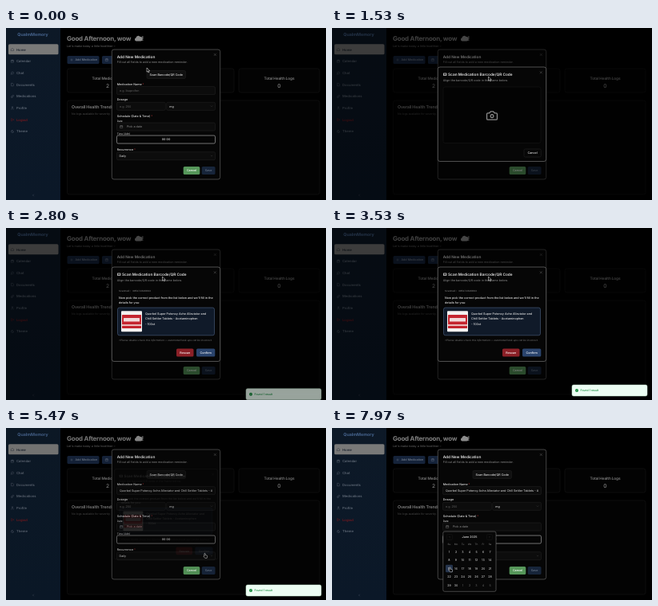
Write an HTML page that moves like this. It is 400 px wide and 216 px high and loops after 8000 ms.

```html
<!DOCTYPE html>
<html lang="en">
<head>
<meta charset="utf-8">
<title>Medication reminder</title>
<style>
html, body { margin: 0; width: 100%; height: 100%; overflow: hidden; background: #000; }
svg { display: block; }
#stage { width: 100%; height: 100%; font-family: Inter, "Open Sans", sans-serif; }
text { text-rendering: geometricPrecision; }
.mono { font-family: "Liberation Mono", "DejaVu Sans Mono", monospace; }
.tight { letter-spacing: -.025em; }
</style>
</head>
<body>
<svg id="stage" viewBox="0 0 400 216"></svg>
<script>
const LOOP = 8000;

// Markup helpers; text is placed by its vertical centre
const text = (x, y, s, { size = 3.7, fill = '#e4e4e4', w = 400, at = 'start', more = '' } = {}) =>
  `<text x="${x}" y="${y + size * .36}" font-size="${size}" fill="${fill}" font-weight="${w}" text-anchor="${at}" ${more}>${s}</text>`;
const mid = (x, y, s, o) => text(x, y, s, { at: 'middle', w: 500, ...o });
const box = (x, y, w, h, fill, line = 'none', r = 1.6, more = '') =>
  `<rect x="${x}" y="${y}" width="${w}" height="${h}" rx="${r}" fill="${fill}" stroke="${line}" stroke-width=".5" ${more}/>`;
const icon = (x, y, size, d, color, weight = 2) =>
  `<path transform="translate(${x - size / 2} ${y - size / 2}) scale(${size / 24})" d="${d}" fill="none" stroke="${color}" stroke-width="${weight}" stroke-linecap="round" stroke-linejoin="round"/>`;
const group = (id, body) => `<g id="${id}">${body}</g>`;

const CROSS = 'M5 5l14 14M19 5 5 19', DOWN = 'M6 9l6 6 6-6', LEFT = 'M15 6l-6 6 6 6', RIGHT = 'M9 6l6 6-6 6';
const DATE = 'M4 5h16v16H4ZM4 10h16M8 2v5M16 2v5', PLUS = 'M12 5v14M5 12h14';
const CAMERA = 'M14.5 4h-5L7 7H4a2 2 0 0 0-2 2v9a2 2 0 0 0 2 2h16a2 2 0 0 0 2-2V9a2 2 0 0 0-2-2h-3ZM12 10a3 3 0 1 0 .1 0';
const NAV = [
  ['Home', 'M3 10l9-7 9 7v11H3Z'],
  ['Calendar', DATE],
  ['Chat', 'M3 21l2-5a8 8 0 1 1 4 4Z'],
  ['Documents', 'M6 2h8l5 5v15H6Z'],
  ['Medications', 'M10 20 20 10a4 4 0 0 0-6-6L4 14a4 4 0 0 0 6 6ZM9 9l6 6'],
  ['Profile', 'M5 21v-2a4 4 0 0 1 4-4h6a4 4 0 0 1 4 4v2M12 3a4 4 0 1 0 .1 0'],
  ['Logout', 'M9 21H4V3h5M16 17l5-5-5-5M21 12H9'],
  ['Theme', 'M12 3a6 6 0 0 0 9 9 9 9 0 1 1-9-9'],
];
const PRODUCT = ['Quorbel Super Potency Ache Alleviator and', 'Chill Settler Tablets - Acetaminophen', '- 100ct'];
const MUTED = '#8c8c8c', FAINT = '#626262', FIELD = '#0c0c0c', LINE = '#242424', EDGE = '#858585';
const ACTION = '#15233a', ACTION_TEXT = '#77818f';

function sidebar() {
  const items = NAV.map(([name, d], i) => {
    const y = 27 + i * 14.7, color = name === 'Logout' ? '#86181d' : i ? '#68727f' : '#141c28';
    return icon(8, y, 4.2, d, color) + text(13, y, name, { size: 4.2, fill: color, w: 500 });
  }).join('');
  return box(0, 0, 68, 216, 'url(#navy)', 'none', 0) +
    mid(33.5, 8.3, 'QualmMemory', { size: 5.3, fill: '#47658f', w: 700 }) +
    box(3, 20.3, 62.5, 13, '#797978') + items + icon(34, 210, 4, LEFT, '#68727f');
}

function page() {
  const stat = (x, name, n) => box(x, 51, 101, 30, '#030303', '#1b1b1b', 2.6) +
    mid(x + 50.5, 63, name, { size: 4.76, fill: '#808080', w: 600, more: 'class="tight"' }) +
    mid(x + 50.5, 73, n, { size: 6.6, fill: '#808080' });
  return text(76, 13, 'Good Afternoon, wow', { size: 7.94, fill: '#808080', w: 700, more: 'class="tight"' }) +
    '<path d="M162.5 16.5a2.2 2.2 0 0 1 0-4.2 2.8 2.8 0 0 1 5-1.4 2.3 2.3 0 0 1 .6 5.6Z" fill="#8c8c8c"/>' +
    text(169.5, 13, '!', { size: 7.94, fill: '#808080', w: 700 }) +
    text(76, 22.6, "Let's make today a little healthier ~", { fill: '#666' }) +
    box(76.5, 35, 40, 10, ACTION) + icon(82, 40, 4, PLUS, ACTION_TEXT) +
    text(86.5, 40, 'Add Medication', { fill: ACTION_TEXT, w: 500 }) +
    box(120, 35, 40, 10, ACTION) + icon(126, 40, 4, DATE, ACTION_TEXT) +
    stat(76.5, 'Total Medications', '2') + stat(184, 'Total Appointments', '0') + stat(291, 'Total Health Logs', '0') +
    box(76.5, 91, 315.5, 118, '#030303', '#1b1b1b', 2.6) +
    text(82, 99.5, 'Overall Health Trends', { size: 5.3, fill: '#808080', w: 600, more: 'class="tight"' }) +
    text(82, 107.7, 'No logs available for severity.', { size: 3.5, fill: '#4a4a4a' });
}

function form() {
  const label = (y, s, star = true) => text(138.7, y, s + (star ? ' <tspan fill="#a33">*</tspan>' : ''), { w: 500 });
  const field = (y, x = 138.5, w = 123) => box(x, y, w, 10, FIELD, LINE);
  return box(132.3, 27, 135.4, 163, '#060606', EDGE, 2.6) +
    text(138.7, 36, 'Add New Medication', { size: 4.76, w: 600 }) +
    text(138.7, 43, 'Fill out all fields to add a new medication reminder.', { fill: MUTED }) +
    icon(261.3, 33.5, 4, CROSS, MUTED) +
    box(176, 53.5, 48.5, 10, '#101010', '#222') + mid(200.3, 58.5, 'Scan Barcode/QR Code') +
    label(70.3, 'Medication Name') + field(73.6) +
    text(142, 78.6, 'e.g. Ibuprofen', { fill: FAINT, more: 'id="hint"' }) +
    `<svg x="142" y="74" width="116" height="9.4">${text(0, 4.6, PRODUCT.join(' '), { more: 'id="name"' })}</svg>` +
    label(89.8, 'Dosage', false) + field(93.3, 138.5, 60.8) + field(93.3, 200.7, 60.8) +
    text(142, 98.3, 'e.g. 250', { fill: FAINT }) + text(204.2, 98.3, 'mg') + icon(257, 98.3, 3.6, DOWN, FAINT) +
    label(110.6, 'Schedule (Date &amp; Time)') +
    text(138.7, 117, 'Date', { size: 3.17 }) + box(138.5, 119, 123, 10, FIELD, LINE, 1.6, 'id="date"') +
    icon(144.3, 124, 4.2, DATE, MUTED) + text(151, 124, 'Pick a date', { fill: MUTED }) +
    text(138.7, 132.8, 'Time (24h)', { size: 3.17 }) + box(138.5, 135, 123, 10, '#050505', '#ddd', 1.6, 'id="time"') +
    mid(200, 140, '00:00') +
    label(152.3, 'Recurrence') + field(155.7) + text(141.5, 160.7, 'Daily') + icon(257, 160.7, 3.6, DOWN, FAINT) +
    box(221.7, 174, 20.6, 10, '#56975a') + mid(232, 179, 'Cancel', { fill: '#fff' }) +
    box(244.7, 174, 16.8, 10, '#17253a') + mid(253.1, 179, 'Save', { fill: '#697688' });
}

function scanner() {
  const view = box(139, 74, 122, 70.5, '#030303', '#1a1a1a', 2.4) + icon(200, 110, 15.5, CAMERA, MUTED) +
    box(240, 152, 21.3, 10, '#070707', '#292929') + mid(250.6, 157, 'Cancel');
  const photo = box(144, 104.3, 26, 26, '#f3f1f0', 'none', 1) + box(145, 109, 24, 17, '#c4252f', 'none', .5) +
    box(147, 113, 20, 4.5, '#f1dada', 'none', .5) + box(145, 121, 24, 2, '#e8b9b9', 'none', 0);
  const result = text(141, 79, 'Scanned: 305172846093', { size: 3.17, fill: MUTED, more: 'class="mono"' }) +
    text(141, 87.8, "Now pick the correct product from the list below and we'll fill in the", { w: 500 }) +
    text(141, 93.2, 'details for you:', { w: 500 }) +
    box(139.5, 100, 121, 34.8, '#101a29', '#5b7398', 2.2) + photo +
    PRODUCT.map((s, i) => text(174, 107.8 + i * 6.3, s, { w: 500 })).join('') +
    text(141, 141, '*Please double-check this information — automated look-ups can be incorrect.',
      { size: 3.1, fill: '#777', more: 'font-style="italic"' }) +
    box(213, 151.5, 21.5, 10, '#8b2027') + mid(223.7, 156.5, 'Rescan', { fill: '#fff' }) +
    box(238, 151.5, 23.3, 10, '#2a446d') + mid(249.7, 156.5, 'Confirm', { fill: '#fff' });
  return box(132.3, 49, 135.4, 118.5, '#060606', '#9a9a9a', 2.6) +
    box(139, 56.5, 4.4, 3.4, '#aaa', 'none', .5) + '<circle cx="141.2" cy="58.2" r="1.1" fill="#333"/>' +
    text(145, 58, 'Scan Medication Barcode/QR Code', { size: 4.76, w: 600 }) +
    text(138.7, 65.2, 'Align the barcode/QR code in the frame below.', { fill: MUTED }) +
    icon(261.3, 55.8, 4, CROSS, MUTED) + group('view', view) + group('result', result);
}

function calendar() {
  const X = i => 146.5 + i % 7 * 8.5;
  const head = ['Su', 'Mo', 'Tu', 'We', 'Th', 'Fr', 'Sa'].map((s, i) => mid(X(i), 146, s, { size: 3.1, fill: '#777', w: 400 }));
  const days = Array.from({ length: 35 }, (_, i) =>
    mid(X(i), 155.3 + Math.floor(i / 7) * 10.6, i % 30 + 1, { fill: i < 30 ? '#e4e4e4' : '#6a6a6a', w: 400 }));
  return box(138.8, 130, 66.2, 75.3, '#070707', EDGE, 2) +
    mid(172, 137, 'June 2025') +
    [[147, LEFT], [197, RIGHT]].map(([x, d]) => box(x - 3.5, 133.5, 7, 7, 'none', '#181818') + icon(x, 137, 3.2, d, FAINT)).join('') +
    box(0, 0, 9, 9.6, '#26354d', 'none', 1.4, 'id="day"') + head.join('') + days.join('');
}

const toast = box(300, 197, 94, 14, '#ecfdf3', '#c4eed3', 2) +
  '<circle cx="306" cy="204" r="2" fill="#128a3a"/>' + icon(306, 204, 2.8, 'M6 12l4 4 8-8', '#fff', 3) +
  text(310.5, 204, 'Found 1 result', { size: 3.44, fill: '#128a3a', w: 500 });

const cursor = '<path id="arrow" d="M0 0V5.2L1.2 4.1 2 6 2.9 5.6 2.1 3.8H3.7Z" fill="#000" stroke="#fff" stroke-width=".5"/>' +
  '<path id="hand" d="M-.6 3.4V.5a.6.6 0 0 1 1.2 0V2.2l2 .5q.7.2.6 1L2.7 5.8H.2L-1.6 3.6q.3-.7 1-.2Z" fill="#000" stroke="#fff" stroke-width=".45"/>';

const stage = document.getElementById('stage');
stage.innerHTML =
  '<linearGradient id="navy" x2="0" y2="1"><stop stop-color="#0d1927"/><stop offset="1" stop-color="#0b1828"/></linearGradient>' +
  page() + sidebar() + form() + group('popover', calendar()) +
  box(0, 0, 400, 216, '#000', 'none', 0, 'id="shade"') +
  group('scan', scanner()) + group('toast', toast) + group('cursor', cursor);
const el = {};
for (const node of stage.querySelectorAll('[id]')) el[node.id] = node;

const ramp = (t, a, b) => Math.min(1, Math.max(0, (t - a) / (b - a)));
const smooth = k => k * k * (3 - 2 * k);
const out = k => 1 - (1 - k) ** 2;
const show = (node, k) => node.setAttribute('opacity', k);
const zoom = (node, k, x, y) => {
  const s = .95 + .05 * k;
  show(node, k);
  node.setAttribute('transform', `translate(${x * (1 - s)} ${y * (1 - s)}) scale(${s})`);
};

// Pointer stops: time, x, y
const PATH = [[0, 176, 50], [30, 176, 50], [330, 195.5, 61], [3830, 195.5, 61], [4850, 248.5, 157.5], [5500, 248.5, 157.5],
  [6450, 198.5, 133.5], [7070, 198.5, 133.5], [7350, 155, 123], [7550, 155, 123], [7860, 154, 175], [7970, 147.5, 175], [LOOP, 147.5, 175]];
function pointer(t) {
  const i = PATH.findIndex((p, n) => n && t <= p[0]);
  const [a, b] = [PATH[i - 1], PATH[i]], k = smooth(ramp(t, a[0], b[0]));
  return [a[1] + (b[1] - a[1]) * k, a[2] + (b[2] - a[2]) * k];
}

function draw(t) {
  const [x, y] = pointer(t);
  const over = (l, top, w, h) => x >= l && x <= l + w && y >= top && y <= top + h;
  const scanOpen = out(ramp(t, 500, 700)) * (1 - ramp(t, 5290, 5495));
  const calOpen = out(ramp(t, 7450, 7620));
  const found = t >= 2600, filled = t >= 5290, modal = t > 520 && t < 5290;

  zoom(el.scan, scanOpen, 200, 108);
  show(el.shade, .5 * scanOpen);
  show(el.view, found ? 0 : 1);
  show(el.result, found ? 1 : 0);
  show(el.hint, filled ? 0 : 1);
  show(el.name, filled ? 1 : 0);
  zoom(el.popover, calOpen, 172, 130);

  const enter = out(ramp(t, 2640, 3040)), leave = ramp(t, 6520, 6840) ** 2;
  show(el.toast, enter * (1 - leave));
  el.toast.setAttribute('transform', `translate(0 ${13 * (1 - enter) + 16 * leave})`);

  const free = !modal && !calOpen;
  const onDate = free && over(138.5, 119, 123, 10), onTime = free && over(138.5, 133, 123, 12);
  el.date.setAttribute('fill', onDate ? '#17202f' : FIELD);
  el.time.setAttribute('fill', onTime ? '#17202f' : '#050505');
  el.time.setAttribute('stroke', onTime ? '#8b97a8' : '#ddd');

  const onDay = calOpen > 0 && over(142, 150.3, 59.5, 53);
  show(el.day, onDay ? 1 : 0);
  el.day.setAttribute('x', 142 + Math.floor((x - 142) / 8.5) * 8.5);
  el.day.setAttribute('y', 150.5 + Math.floor((y - 150.3) / 10.6) * 10.6);

  const onButton = modal ? over(238, 151.5, 23.3, 10) : over(176, 53.5, 48.5, 10) || over(138.5, 155.7, 123, 10);
  const hand = onDate || onTime || onDay || onButton;
  show(el.hand, hand ? 1 : 0);
  show(el.arrow, hand ? 0 : 1);
  el.cursor.setAttribute('transform', `translate(${x} ${y})`);
}

const start = performance.now();
function tick() {
  draw((performance.now() - start) % LOOP);
  requestAnimationFrame(tick);
}
tick();
</script>
</body>
</html>
```
